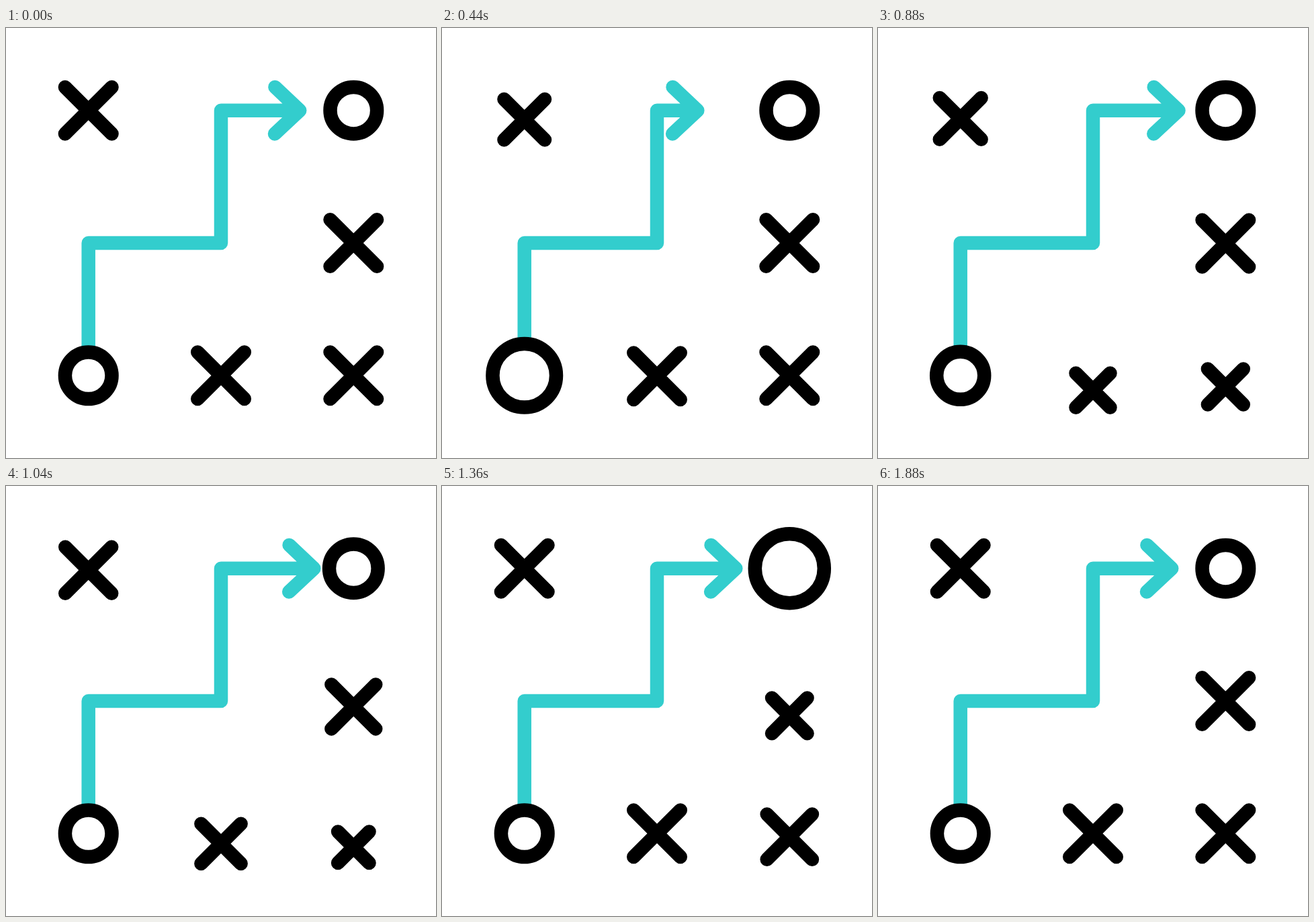
Write an HTML page with a canvas that moves like this. It is 640 by 640 pixels and loops after 2000 ms.

```html
<!DOCTYPE html>
<html lang="en">
<head>
<meta charset="utf-8">
<title>Strategy path</title>
<style>
html, body { margin: 0; width: 100%; height: 100%; overflow: hidden; background: #fff; }
canvas { display: block; width: 100vmin; height: 100vmin; }
</style>
</head>
<body>
<canvas id="stage" width="640" height="640"></canvas>
<script>
const ctx = document.getElementById("stage").getContext("2d");
const LOOP = 2000, STEP = 40;
const A = 122.7, B = 320, C = 517.3;
const ARM = 34.8, WIDTH = 20.5;
const INK = "#000", TEAL = "#33cdcd";

// x, y, start, peak, end, drop, shrink
const crosses = [
  [A, A, 160, 640, 1170, 21, 9.2],
  [B, C, 370, 850, 1340, 22, 9.4],
  [C, C, 540, 1025, 1530, 20.5, 11.6],
  [C, B, 820, 1330, 1870, 22, 8.6]
];

// Cubic ease-in-out with handles at .42 and .58
function ease(u) {
  if (u <= 0) return 0;
  if (u >= 1) return 1;
  let lo = 0, hi = 1, s = 0.5;
  for (let i = 0; i < 24; i++) {
    s = (lo + hi) / 2;
    const q = 1 - s;
    const x = 1.26 * q * q * s + 1.74 * q * s * s + s * s * s;
    if (x < u) lo = s; else hi = s;
  }
  return s * s * (3 - 2 * s);
}

const ramp = (t, from, to) => ease((t - from) / (to - from));
const pulse = (t, start, peak, end) =>
  t < peak ? ramp(t, start, peak) : 1 - ramp(t, peak, end);

function stroke(color, ...lines) {
  ctx.strokeStyle = color;
  ctx.beginPath();
  for (const line of lines) {
    line.forEach(([x, y], i) => i ? ctx.lineTo(x, y) : ctx.moveTo(x, y));
  }
  ctx.stroke();
}

function ring(x, y, r) {
  ctx.beginPath();
  ctx.arc(x, y, r, 0, Math.PI * 2);
  ctx.fillStyle = "#fff";
  ctx.fill();
  ctx.strokeStyle = INK;
  ctx.stroke();
}

function cross(t, [x, y, start, peak, end, drop, shrink]) {
  const f = pulse(t, start, peak, end);
  const h = ARM - shrink * Math.pow(f, 1.6);
  const cy = y + drop * f;
  stroke(INK,
    [[x - h, cy - h], [x + h, cy + h]],
    [[x + h, cy - h], [x - h, cy + h]]);
}

function arrow(t) {
  const dx = -57.8 * ramp(t, 40, 480) + 79.1 * ramp(t, 480, 1020) - 21.3 * ramp(t, 1020, 1380);
  const tip = 437.2 + dx;
  const tail = 482.5 - 20.5 * pulse(t, 40, 640, 1000);
  stroke(TEAL,
    [[A, tail], [A, B], [B, B], [B, A], [tip, A]],
    [[tip - 36.8, A - 34.8], [tip, A], [tip - 37.2, A + 34.8]]);
}

function draw(t) {
  ctx.fillStyle = "#fff";
  ctx.fillRect(0, 0, 640, 640);
  ctx.lineWidth = WIDTH;
  ctx.lineCap = ctx.lineJoin = "round";
  arrow(t);
  crosses.forEach(c => cross(t, c));
  ring(A, C, ARM + 12.7 * pulse(t, 40, 480, 960));
  ring(C, A, ARM + 16.7 * pulse(t, 955, 1360, 1835));
}

function tick() {
  const t = performance.now() % LOOP;
  draw(Math.floor(t / STEP) * STEP);
  requestAnimationFrame(tick);
}
tick();
</script>
</body>
</html>
```
